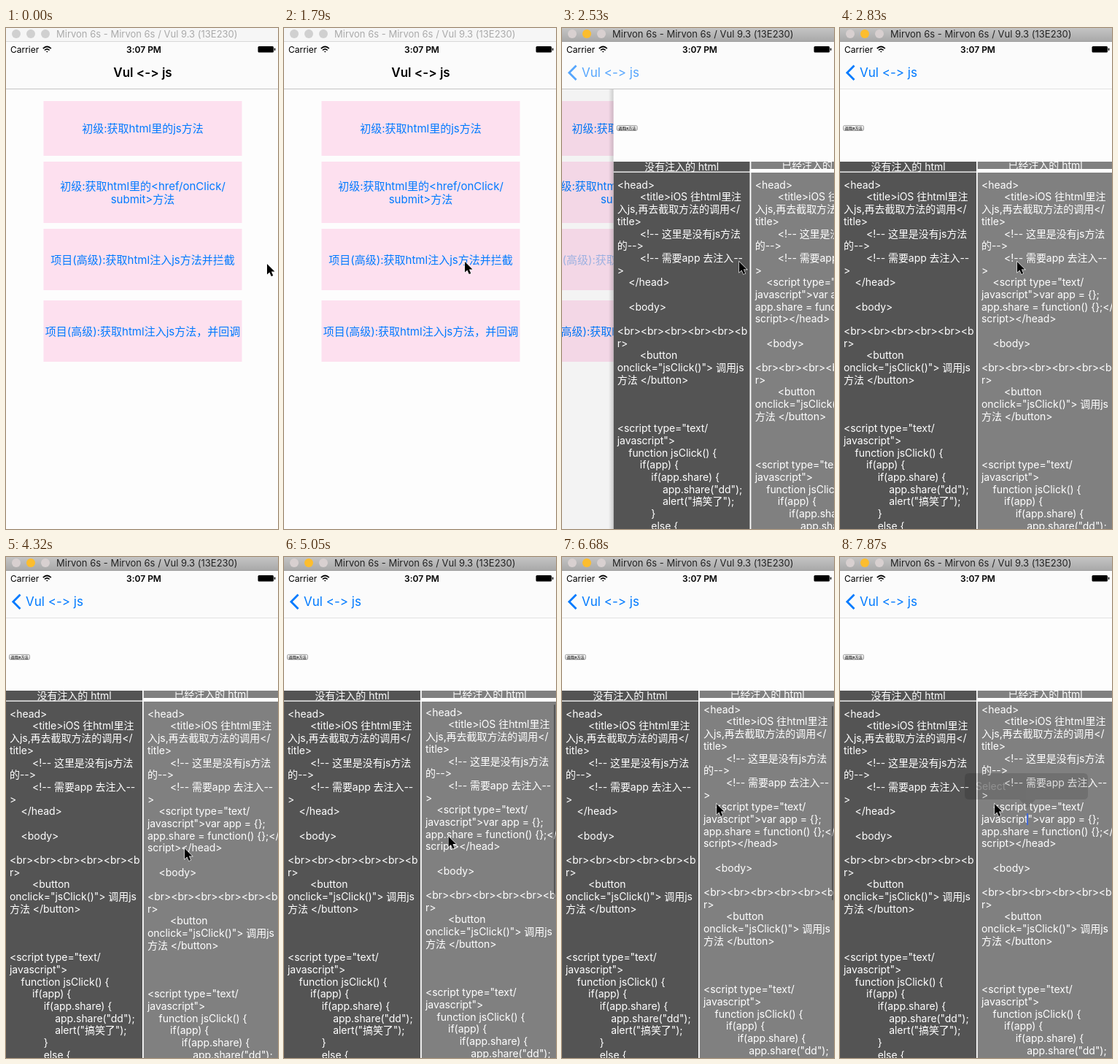
Animation, 373 px wide and 686 px high, one loop 8000 ms. Source, as an HTML page:

```html
<!DOCTYPE html>
<html lang="zh">
<head>
<meta charset="utf-8">
<style>
html, body { margin: 0; width: 100%; height: 100%; overflow: hidden; background: #fdfdfd; }
svg { display: block; width: 373px; height: 686px; }
text {
  font-family: Inter, "Noto Sans CJK SC", "Noto Sans CJK", sans-serif;
  font-variant-ligatures: none; font-feature-settings: "calt" 0; white-space: pre;
}
.mid { text-anchor: middle; }
.code text { font-size: 14px; letter-spacing: -.05px; fill: #fff; }
</style>
</head>
<body>
<svg viewBox="0 0 373 686" xmlns="http://www.w3.org/2000/svg">
  <defs>
    <linearGradient id="bar" x2="0" y2="1"><stop stop-color="#c4c4c4"/><stop offset="1" stop-color="#a9a9a9"/></linearGradient>
    <linearGradient id="shade"><stop stop-opacity="0"/><stop offset="1" stop-opacity=".16"/></linearGradient>
    <linearGradient id="key" x2="0" y2="1"><stop stop-color="#fff"/><stop offset="1" stop-color="#ccc"/></linearGradient>
    <clipPath id="leftBox"><rect x="0" y="198" width="187" height="488"/></clipPath>
    <clipPath id="rightBox"><rect x="188" y="198" width="185" height="488"/></clipPath>
    <clipPath id="headBox"><rect x="188" y="183" width="185" height="10"/></clipPath>
  </defs>
  <rect width="373" height="686" fill="#fdfdfd"/>

  <g id="menu"></g>
  <rect id="dim" y="84" width="373" height="602" opacity="0"/>

  <g id="page">
    <rect x="-7" y="84" width="7" height="602" fill="url(#shade)"/>
    <rect y="84" width="373" height="602" fill="#fdfdfd"/>
    <rect x="4.500" y="133.500" width="28" height="7" rx="2" fill="url(#key)" stroke="#8a8a8a" stroke-width=".8"/>
    <text class="mid" x="18.500" y="138.900" font-size="5" font-weight="500">调用js方法</text>
    <rect y="183" width="187" height="503" fill="#545454"/>
    <rect x="188.500" y="183" width="185" height="503" fill="#808080"/>
    <rect x="187" y="183" width="1.500" height="503" fill="#fff"/>
    <rect y="196.500" width="188" height="1.300" fill="#fff"/>
    <rect x="187" y="193" width="186" height="5" fill="#fff"/>
    <g class="code">
      <text class="mid" x="93.500" y="195">没有注入的 html</text>
      <g clip-path="url(#headBox)"><text class="mid" x="281.500" y="193">已经注入的 html</text></g>
      <g clip-path="url(#leftBox)"><g id="before"></g></g>
      <g clip-path="url(#rightBox)"><g id="after"></g></g>
    </g>
    <rect id="thumb" x="370" width="2" height="266" rx="1" opacity="0"/>
    <rect id="caret" x="256" y="351" width="2" height="16" fill="#4269d8"/>
    <g id="bubble">
      <path d="M177 296H334Q340 296 340 302V326Q340 332 334 332H268L257 344L246 332H177Q171 332 171 326V302Q171 296 177 296Z"/>
      <text x="186" y="319" font-size="14" fill="#fff">Select</text>
    </g>
  </g>

  <rect y="18" width="373" height="65" fill="#fbfbfb"/>
  <rect id="rule" y="83" width="373" height="1"/>
  <text id="title" class="mid" y="67" font-size="17" font-weight="600">Vul &lt;-&gt; js</text>
  <g id="back" fill="#007aff">
    <path d="M19.500 51.500L9.800 61.200L19.500 71" fill="none" stroke="#007aff" stroke-width="2.800"/>
    <text x="27" y="67" font-size="17">Vul &lt;-&gt; js</text>
  </g>
  <text x="6" y="33.500" font-size="12">Carrier</text>
  <g fill="none" stroke="#000" stroke-width="1.700">
    <path d="M50.800 28.200Q56.300 22.800 61.800 28.200M53 30.500Q56.300 27.300 59.600 30.500"/>
    <path d="M54.800 31.800H57.800L56.300 33.400Z" fill="#000" stroke="none"/>
  </g>
  <text class="mid" x="189" y="33.500" font-size="12" font-weight="600">3:07 PM</text>
  <rect x="345.500" y="25" width="21.500" height="8.500" rx="1.500"/>
  <rect x="367.800" y="27.500" width="1.500" height="3.500" rx=".7"/>

  <rect id="frame" width="373" height="18"/>
  <rect id="edge" y="18" width="373" height="1"/>
  <circle class="dot" cx="14" cy="8" r="6"/>
  <circle class="dot" cx="34" cy="8" r="6"/>
  <circle class="dot" cx="54" cy="8" r="6"/>
  <text id="name" x="69" y="13" font-size="13">Mirvon 6s - Mirvon 6s / Vul 9.3 (13E230)</text>

  <path id="cursor" d="M0 0V14.500L3.400 11.500L5.800 17L8.300 15.900L5.900 10.600H10.500Z" stroke="#fff" stroke-width="1.200" paint-order="stroke"/>
</svg>
<script>
const LOOP = 8000, STEP = 148.6, PITCH = 16.68;
const $ = id => document.getElementById(id);
const dots = document.querySelectorAll('.dot');

function add(parent, tag, attrs, label) {
  const el = document.createElementNS('http://www.w3.org/2000/svg', tag);
  set(el, attrs);
  if (label) el.textContent = label;
  parent.append(el);
  return el;
}
function set(el, attrs) {
  for (const k in attrs) el.setAttribute(k, attrs[k]);
}

const labels = [];
function button(y, h, ...lines) {
  add($('menu'), 'rect', { x: 51.5, y, width: 272, height: h, fill: '#fde0ef' });
  lines.forEach((s, i) => labels.push(add($('menu'), 'text', {
    class: 'mid', x: 187.5, y: y + h / 2 + 5.7 + (i - (lines.length - 1) / 2) * 18,
    'font-size': 15, fill: '#007aff'
  }, s)));
}
button(100, 75, '初级:获取html里的js方法');
button(183, 84, '初级:获取html里的<href/onClick/', 'submit>方法');
button(275, 84, '项目(高级):获取html注入js方法并拦截');
button(373, 84, '项目(高级):获取html注入js方法，并回调');

// \x3c keeps the HTML parser from reading comment and script tags here.
const head = `<head>
        <title>iOS 往html里注
入js,再去截取方法的调用</
title>
        \x3c!-- 这里是没有js方法
的-->
        \x3c!-- 需要app 去注入--
>
`;
const injected = `    \x3cscript type="text/
javascript">var app = {};
app.share = function() {};</
script></head>`;
const body = `

    <body>

<br><br><br><br><br><b
r>
        <button
onclick="jsClick()"> 调用js
方法 </button>



\x3cscript type="text/
javascript">
    function jsClick() {
        if(app) {
            if(app.share) {
                app.share("dd");
                alert("搞笑了");
            }
            else {`;
function listing(id, x, code) {
  code.split('\n').forEach((s, i) => {
    if (s) add($(id), 'text', { x, y: 219.8 + i * PITCH }, s);
  });
}
listing('before', 5, head + '    </head>' + body);
listing('after', 194, head + injected + body);

// Keys are [step, value, ...]; values between keys are linear.
function track(keys, n) {
  let i = 0;
  while (i < keys.length - 2 && keys[i + 1][0] <= n) i++;
  const a = keys[i], b = keys[i + 1];
  const p = Math.min(1, Math.max(0, (n - a[0]) / (b[0] - a[0])));
  return a.slice(1).map((v, j) => v + (b[j + 1] - v) * p);
}
const pointer = [
  [0, 358, 323], [1, 340, 336], [2, 305, 342], [3, 272, 331], [4, 252, 320], [11, 252, 320],
  [12, 248, 320], [14, 247, 320], [16, 243, 320], [19, 243, 320], [21, 262, 362], [23, 282, 403],
  [24, 282, 403], [25, 284, 402], [29, 245, 399], [31, 238, 399], [32, 238, 399],
  [36, 213, 366], [37, 213, 366], [39, 212, 354], [41, 212, 338], [53, 212, 338]
];
const scroll = [[32, 0], [36, -4], [37, -4], [39, -16], [41, -27], [43, -18], [45, -6], [53, -6]];

function draw(ms) {
  const n = Math.floor((ms + 10) / STEP);
  const t = n * STEP;
  const push = t < 2310 ? 0 : t > 2800 ? 1 : 1 - Math.exp((2310 - t) / 130);
  const active = n >= 13;

  set($('frame'), { fill: active ? 'url(#bar)' : '#f6f6f6' });
  set($('edge'), { fill: active ? '#a0a0a0' : '#d8d8d8' });
  set($('name'), { fill: active ? '#222' : '#aaa' });
  const tints = active ? ['#d8d0d0', '#fcbd2e', '#d8d0d0'] : ['#d0d0d0', '#d0d0d0', '#d0d0d0'];
  dots.forEach((d, i) => set(d, { fill: tints[i] }));

  set($('menu'), { transform: `translate(${-112 * push} 0)` });
  set($('dim'), { opacity: Math.min(.04, push * .1) });
  set(labels[3], { fill: n >= 14 ? '#a3b8ea' : '#007aff' });
  set($('page'), { transform: `translate(${373 * (1 - push)} 0)`, visibility: push ? 'visible' : 'hidden' });
  set($('rule'), { fill: push === 1 ? '#e2e2e2' : '#c4c4c4' });
  set($('title'), { x: 187.5 - 102 * push, opacity: Math.max(0, 1 - push * 1.5) });
  set($('back'), { opacity: Math.max(0, (push - .45) / .55) });

  const [y] = track(scroll, n);
  set($('after'), { transform: `translate(0 ${y})` });
  set($('thumb'), { y: 201 - y * .5, opacity: n < 33 || n > 46 ? 0 : n === 46 ? .15 : .35 });
  set($('caret'), { opacity: n >= 51 ? 1 : 0 });
  set($('bubble'), { opacity: n < 52 ? 0 : n === 52 ? .06 : .13 });
  set($('cursor'), { transform: `translate(${track(pointer, n).join(' ')})` });
}

function tick(now) {
  draw(now % LOOP);
  requestAnimationFrame(tick);
}
draw(0);
requestAnimationFrame(tick);
</script>
</body>
</html>
```
